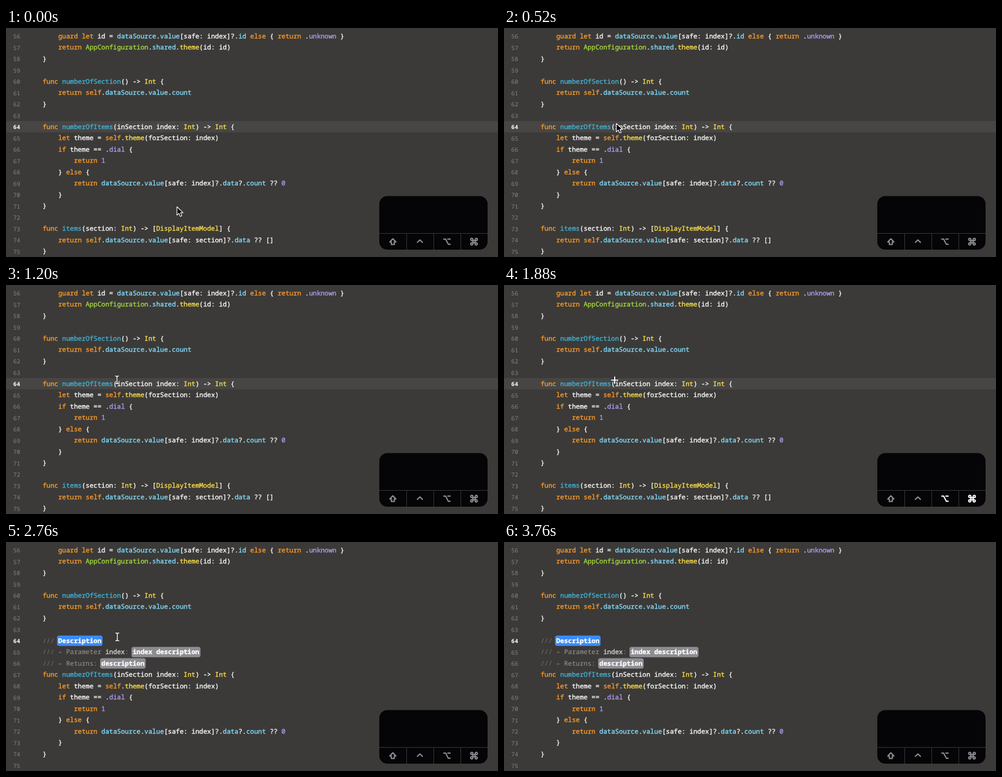
Recreate the animation shown at these times as an HTML page. Size 800 px wide and 374 px high, loop 3800 ms.

```html
<!DOCTYPE html>
<html lang="en">
<head>
<meta charset="utf-8">
<title>Documentation shortcut</title>
<style>
html, body { margin: 0; width: 100%; height: 100%; overflow: hidden; background: #3b3a38; }
svg { display: block; width: 800px; height: 374px; }
text { font: 500 10.61px "Noto Sans Mono", "DejaVu Sans Mono", monospace; color: #fff; fill: currentColor; stroke: currentColor; stroke-width: .32px; white-space: pre; text-rendering: geometricPrecision; }
.num { font-size: 9.3px; font-weight: 400; color: #868583; stroke: none; text-anchor: end; }
.num.on { color: #fff; font-weight: 600; }
.key { color: #ff9d2b; }
.type, .call { color: #ffe14a; }
.app { color: #a8dc3c; }
.name { color: #43b4d8; }
.prop { color: #84dfff; }
.lit { color: #b49cf0; }
.dim { color: #737270; stroke: none; }
.doc { color: #9b9a98; stroke: none; }
.arg { color: #d8d7d5; }
.slot { font-weight: 600; }
.glyph { fill: none; stroke-linecap: round; stroke-linejoin: round; }
</style>
</head>
<body>
<svg id="stage" viewBox="0 0 800 374">
  <rect width="800" height="374" fill="#3b3a38"/>
  <g id="before">
    <rect y="152" width="800" height="18.5" fill="#474644"/>
    <g id="match">
      <rect x="173.5" y="152.5" width="141" height="19.5" rx="3.5" fill="#2c64ad"/>
      <rect x="181" y="152" width="127" height="18.5" fill="#474644"/>
    </g>
  </g>
  <g id="after"></g>
  <g id="common"></g>
  <g id="panel">
    <rect x="607" y="274.5" width="176" height="87.5" rx="13" fill="#050406"/>
    <path d="M607 335.5H783M651.5 336V362M695.5 336V362M739.5 336V362" stroke="#343335" fill="none"/>
  </g>
  <g id="big" stroke="#fff"></g>
  <g id="cursor">
    <path id="arrow" d="M0 0V13.6L3.2 10.7L5.4 15.7L7.9 14.6L5.8 9.8H10Z" fill="#000" stroke="#fff" stroke-width="1.1" stroke-linejoin="round"/>
    <g id="beam" fill="none">
      <path d="M-3 -6.5Q0 -6.5 0 -4.5Q0 -6.5 3 -6.5M0 -4.5V4.5M-3 6.5Q0 6.5 0 4.5Q0 6.5 3 6.5" stroke="#222" stroke-width="2.8"/>
      <path d="M-3 -6.5Q0 -6.5 0 -4.5Q0 -6.5 3 -6.5M0 -4.5V4.5M-3 6.5Q0 6.5 0 4.5Q0 6.5 3 6.5" stroke="#fff" stroke-width="1.4"/>
    </g>
    <g id="cross" fill="none">
      <path d="M-6.5 0H6.5M0 -6.5V6.5" stroke="#222" stroke-width="3.6"/>
      <path d="M-6 0H6M0 -6V6" stroke="#fff" stroke-width="1.9"/>
    </g>
  </g>
</svg>
<script>
const LOOP = 3800, STEP = 40;
const LEFT = 59.5, CHAR = 6.37, PITCH = 18.5;
const $ = id => document.getElementById(id);

function add(parent, tag, attrs, content) {
  const el = document.createElementNS('http://www.w3.org/2000/svg', tag);
  for (const k in attrs) el.setAttribute(k, attrs[k]);
  if (content) el.textContent = content;
  return parent.appendChild(el);
}

const baseline = line => 16.7 + (line - 56) * PITCH;
const write = (g, line, col, s, cls = '') =>
  add(g, 'text', { x: LEFT + col * CHAR, y: baseline(line), class: cls }, s);

const rules = [
  ['key', /\b(?:guard|let|else|return|func|if|self)\b/],
  ['type', /\b(?:Int|DisplayItemModel)\b/],
  ['app', /AppConfiguration/],
  ['name', /(?<=func )\w+/],
  ['call', /(?<=(?:self|shared)\.)theme/],
  ['prop', /dataSource|(?<=\.)(?:value|data|count|shared|id)\b/],
  ['lit', /(?<=\.)(?:unknown|dial)|\b\d\b/],
  ['', /[^\s\w]+|\w+/]
];
const lexer = new RegExp(rules.map(r => `(${r[1].source})`).join('|'), 'g');

function code(g, first, source) {
  source.split('\n').forEach((row, i) => {
    for (const m of row.matchAll(lexer)) {
      const kind = m.slice(1).findIndex(s => s !== undefined);
      write(g, first + i, m.index, m[0], rules[kind][0]);
    }
  });
}

function slot(line, col, s, fill) {
  add($('after'), 'rect', {
    x: LEFT + col * CHAR - 2, y: baseline(line) - 12,
    width: s.length * CHAR + 4, height: 17, rx: 3.5, fill
  });
  write($('after'), line, col, s, 'slot');
}

const head = `    guard let id = dataSource.value[safe: index]?.id else { return .unknown }
    return AppConfiguration.shared.theme(id: id)
}

func numberOfSection() -> Int {
    return self.dataSource.value.count
}`;
const body = `func numberOfItems(inSection index: Int) -> Int {
    let theme = self.theme(forSection: index)
    if theme == .dial {
        return 1
    } else {
        return dataSource.value[safe: index]?.data?.count ?? 0
    }
}`;
const tail = `func items(section: Int) -> [DisplayItemModel] {
    return self.dataSource.value[safe: section]?.data ?? []
}`;

code($('common'), 56, head);
code($('before'), 64, body);
code($('before'), 73, tail);
code($('after'), 67, body);
for (let n = 56; n <= 75; n++)
  add($('common'), 'text', { x: 23, y: baseline(n) + .5, class: n === 64 ? 'num on' : 'num' }, String(n));

for (const n of [64, 65, 66]) write($('after'), n, 0, '///', 'dim');
slot(64, 4, 'Description', '#3a8bf8');
write($('after'), 65, 4, '– Parameter', 'doc');
write($('after'), 65, 16, 'index', 'arg');
write($('after'), 65, 21, ':', 'doc');
slot(65, 23, 'index description', '#8d8c91');
write($('after'), 66, 4, '– Returns:', 'doc');
slot(66, 15, 'description', '#8d8c91');

// Modifier key symbols, drawn around their centre
const glyphs = {
  shift: 'M0 -5.3L5.5 .5H2.7V5H-2.7V.5H-5.5Z',
  control: 'M-4.5 1.2L0 -3.2L4.5 1.2',
  option: 'M-5.8 -4.6H-2.3L2.4 4.6H5.8M1.5 -4.6H5.8',
  command: 'M-2 -4a2 2 0 1 0 -2 2H4a2 2 0 1 0 -2 -2V4a2 2 0 1 0 2 -2H-4a2 2 0 1 0 2 2Z',
  slash: 'M-2.4 6L2.4 -6'
};
const glyph = (g, key, x, y, scale, width) => add(g, 'path', {
  d: glyphs[key], class: 'glyph', 'stroke-width': width,
  transform: `translate(${x} ${y}) scale(${scale})`
});
const keys = ['shift', 'control', 'option', 'command'].map((k, i) =>
  glyph($('panel'), k, 629 + 44 * i, 349, .9, 2.2));
glyph($('big'), 'option', 669, 306, 2.7, 1.5);
glyph($('big'), 'command', 706.5, 306, 2.35, 1.65);
glyph($('big'), 'slash', 733.5, 306.5, 2.7, 1.5);

// Pointer path: time, x, y
const path = [
  [40, 278, 292], [480, 183, 156], [640, 181, 155], [1720, 180, 155],
  [2080, 180, 156], [2440, 181, 155], [2960, 181, 155], [3200, 230, 384]
];
function pointer(t) {
  const i = path.findIndex(p => p[0] > t);
  if (i < 0) return path[path.length - 1].slice(1);
  if (i === 0) return path[0].slice(1);
  const a = path[i - 1], b = path[i];
  const u = (t - a[0]) / (b[0] - a[0]), e = u * u * (3 - 2 * u);
  return [a[1] + (b[1] - a[1]) * e, a[2] + (b[2] - a[2]) * e];
}

const show = (id, on) => { $(id).style.display = on ? '' : 'none'; };

function draw(t) {
  const inserted = t >= 2440;
  const held = t >= 1760 && t < 2600;
  show('before', !inserted);
  show('after', inserted);
  show('match', t >= 2080);
  show('big', t >= 2280 && t < 2600);
  keys.forEach((k, i) => k.setAttribute('stroke', held && i > 1 ? '#fff' : '#8e8d8f'));
  show('arrow', t < 640);
  show('cross', held);
  show('beam', t >= 640 && !held);
  show('cursor', t < 3200);
  $('cursor').setAttribute('transform', `translate(${pointer(t)})`);
}

const start = performance.now();
function tick() {
  const t = (performance.now() - start) % LOOP;
  draw(Math.floor(t / STEP) * STEP);
  requestAnimationFrame(tick);
}
draw(0);
requestAnimationFrame(tick);
</script>
</body>
</html>
```
